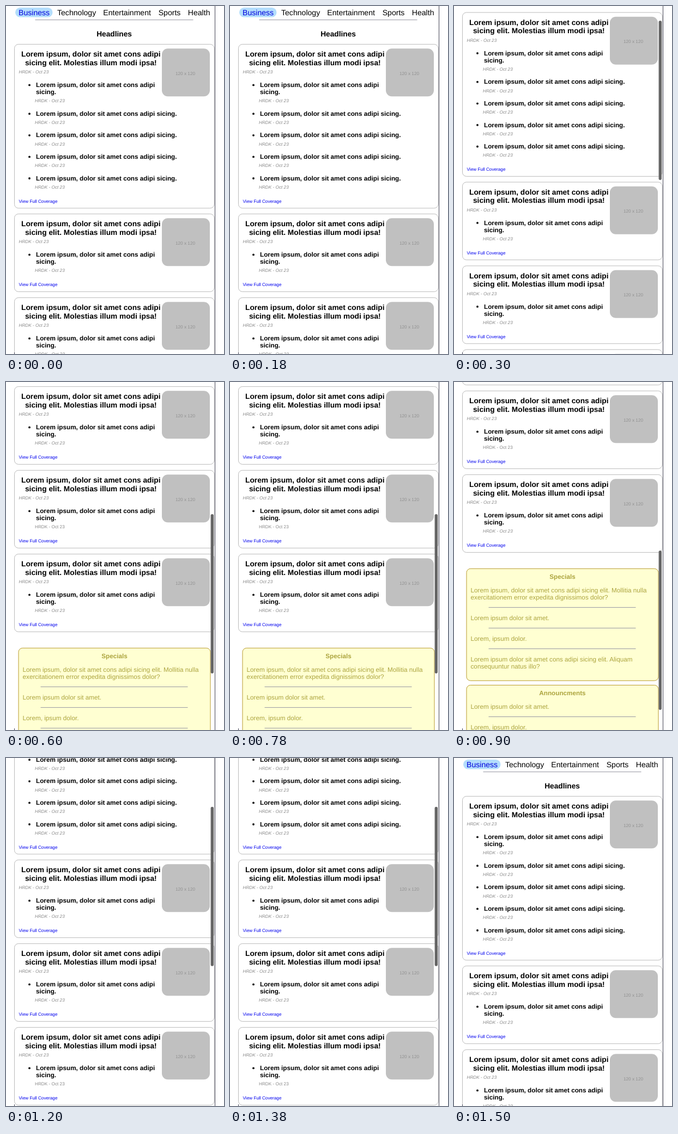
These frames come from a looping animation (400 by 640 pixels, 1.8 s). An HTML page:

```html
<!DOCTYPE html>
<html lang="en">
<head>
<meta charset="utf-8">
<title>Headlines</title>
<style>
html, body { margin: 0; height: 100%; overflow: hidden; background: #fff; }
svg { display: block; }
text { font: 11.73px "Liberation Sans", Arial, sans-serif; text-rendering: geometricPrecision; white-space: pre; }
.nav { font-size: 14.08px; }
.head { font-size: 13.73px; font-weight: bold; }
.item { font-weight: bold; }
.meta { font-size: 8.21px; font-style: italic; fill: #888; }
.plain { font-size: 8.21px; fill: #888; }
.link { font-size: 8.21px; fill: #00e; }
.size { font-size: 8.21px; fill: #919191; }
.note { fill: #aca43e; }
.bold { font-weight: bold; }
.mid { text-anchor: middle; }
</style>
</head>
<body>
<svg width="400" height="640" viewBox="0 0 400 640">
  <g id="page"></g>
  <rect x="383" width="1" height="640" fill="#445"/>
  <rect x="15" y="637" width="1" height="3" fill="#445"/>
  <rect id="thumb" x="375.6" width="5.4" height="293" rx="2.7" fill="#666"/>
</svg>
<script>
const page = document.getElementById('page');
const thumb = document.getElementById('thumb');
let out = '';

const text = (x, y, str, cls) => out += `<text x="${x}" y="${y}" class="${cls}">${str}</text>`;
const box = (x, y, w, h, r, fill, stroke = 'none') =>
  out += `<rect x="${x}" y="${y}" width="${w}" height="${h}" rx="${r}" fill="${fill}" stroke="${stroke}"/>`;
const rule = (x, y, w) => box(x, y, w, 1, 0, '#9696a2');

const LOREM = 'Lorem ipsum, dolor sit amet cons adipi';
const META = 'HRDK - Oct 23';

function card(y, extra, lastMeta = 'meta') {
  const h = 143 + extra * 39.6;
  box(15.5, y, 366.5, h, 7.3, '#fff', '#bbb');
  box(286, y + 7.8, 88, 88, 11, '#c0c0c0');
  text(329, y + 56.4, '120 x 120', 'size mid');
  text(155.8, y + 22.7, LOREM, 'head mid');
  text(155.8, y + 38.1, 'sicing elit. Molestias illum modi ipsa!', 'head mid');
  text(23.5, y + 53.7, META, 'meta');
  for (let i = 0; i <= extra; i++) {
    const base = y + (i ? 91.8 + i * 39.6 : 78.6);
    out += `<circle cx="43" cy="${base - 3.6}" r="1.9"/>`;
    text(55, base, i ? LOREM + ' sicing.' : LOREM, 'item');
    if (!i) text(55, base + 13.2, 'sicing.', 'item');
    text(53, y + 107 + i * 39.6, META, lastMeta);
  }
  text(23.5, y + h - 10, 'View Full Coverage', 'link');
}

// Each note is a list of lines; notes are separated by rules.
function panel(y, h, title, notes) {
  box(23, y, 352, h, 7.3, '#ffffd2', '#b89a30');
  text(199, y + 18.2, title, 'note bold mid');
  let base = y + 43.2;
  notes.forEach((lines, i) => {
    if (i) {
      rule(63.5, base + 1.2, 270);
      base += 24.8;
    }
    lines.forEach((line, j) => text(30.5, base + j * 13.2, line, 'note'));
    base += lines.length * 13.2;
  });
}

box(17, 3, 68.5, 17.5, 8.75, '#b3ddfc');
text(23, 17, 'Business', 'nav" fill="#00d');
text(94, 17, 'Technology', 'nav');
text(178.3, 17, 'Entertainment', 'nav');
text(279.7, 17, 'Sports', 'nav');
text(333.8, 17, 'Health', 'nav');
rule(53.5, 25, 290);
text(198.6, 56, 'Headlines', 'head mid');

card(70.4, 4);
card(382.4, 0);
card(536.4, 0);
card(690.4, 0, 'plain');
card(844.4, 0);
panel(1017.3, 206, 'Specials', [
  [LOREM + ' sicing elit. Mollitia nulla', 'exercitationem error expedita dignissimos dolor?'],
  ['Lorem ipsum dolor sit amet.'],
  ['Lorem, ipsum dolor.'],
  ['Lorem ipsum dolor sit amet cons adipi sicing elit. Aliquam', 'consequuntur natus illo?']
]);
panel(1231.5, 150, 'Announcments', [
  ['Lorem ipsum dolor sit amet.'],
  ['Lorem, ipsum dolor.']
]);
page.innerHTML = out;

// Scroll position jumps every 300 ms; the thumb hides at the top.
const scrolls = [0, 58.5, 528, 674, 195, 0];
function draw() {
  const top = scrolls[Math.floor(performance.now() % 1800 / 300)];
  page.setAttribute('transform', `translate(0 ${-top})`);
  thumb.setAttribute('y', top * 0.46);
  thumb.setAttribute('visibility', top ? 'visible' : 'hidden');
  requestAnimationFrame(draw);
}
draw();
</script>
</body>
</html>
```
